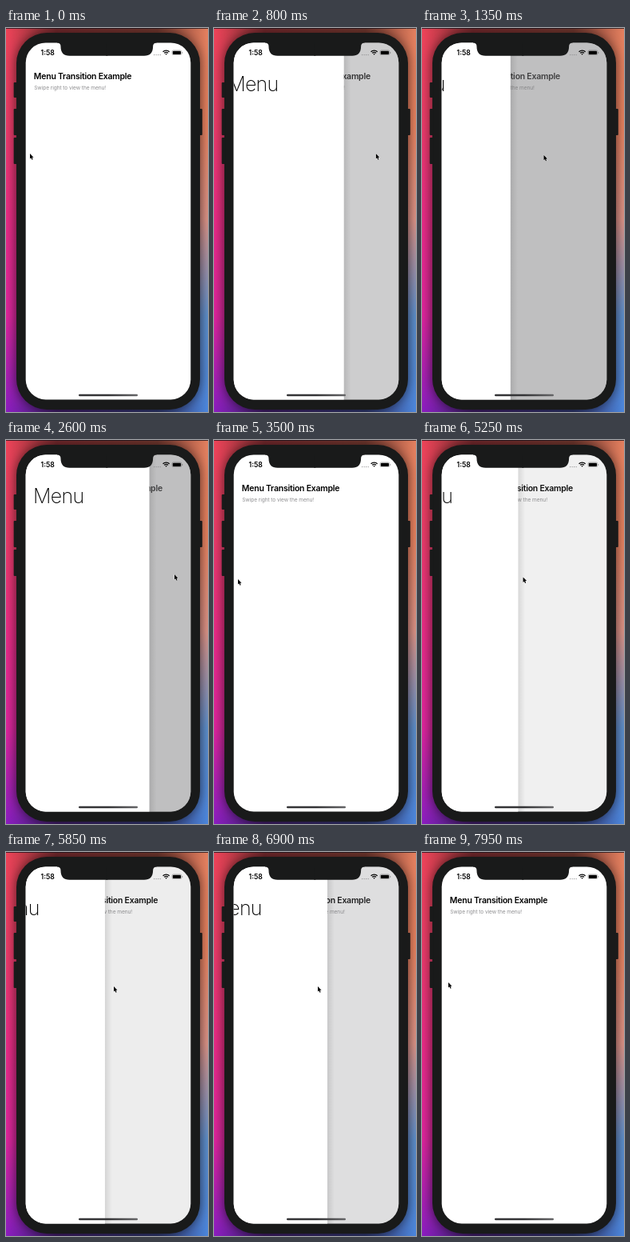
These frames come from a looping animation (253x480 px, 8000 ms). An HTML page with a canvas:

```html
<!DOCTYPE html>
<html lang="en">
<head>
<meta charset="utf-8">
<title>Menu transition</title>
<style>
html, body { margin: 0; width: 100%; height: 100%; overflow: hidden; }
canvas { display: block; width: 253px; height: 480px; }
</style>
</head>
<body>
<canvas id="stage"></canvas>
<script>
const W = 253, H = 480, LOOP = 8000, STEP = 50;
const SCREEN = { x: 24.7, y: 18.4, w: 206.6, h: 446, r: 25 };
const MENU_X = 25, MENU_W = 154.5;
const BEZEL = '#191a1a';
const FONT = 'Inter, Roboto, "Open Sans", sans-serif';

// Each swipe eases the pointer to (x, y) and the menu to `open`
const REST = { x: 30, y: 157, open: 0 };
const SWIPES = [
  { at: 250, dur: 700, x: 224, y: 157, open: 1 },
  { at: 1100, dur: 600, x: 31, y: 162, open: 0 },
  { at: 2050, dur: 550, x: 211, y: 168, open: 1 },
  { at: 2800, dur: 700, x: 30, y: 174, open: 0 },
  { at: 4215, dur: 700, x: 154, y: 174, open: 0.78 },
  { at: 5000, dur: 550, x: 90, y: 168, open: 0.4 },
  { at: 5600, dur: 500, x: 180, y: 168, open: 0.88 },
  { at: 6200, dur: 400, x: 130, y: 168, open: 0.514 },
  { at: 6700, dur: 400, x: 130, y: 168, open: 1 },
  { at: 7200, dur: 600, x: 33, y: 163, open: 0 }
];

const canvas = document.getElementById('stage');
const ctx = canvas.getContext('2d');
const dpr = window.devicePixelRatio || 1;
canvas.width = W * dpr;
canvas.height = H * dpr;

const clamp = v => Math.max(0, Math.min(1, v));
const mix = (a, b, u) => a + (b - a) * u;
const ease = u => (1 - Math.cos(Math.PI * clamp(u))) / 2;

function pose(t) {
  let s = { ...REST, closing: false };
  for (const swipe of SWIPES) {
    if (t < swipe.at) break;
    const u = ease((t - swipe.at) / swipe.dur);
    const closing = swipe.open === 0;
    s = {
      x: mix(s.x, swipe.x, u),
      y: mix(s.y, swipe.y, u),
      // a closing menu gets there before the pointer stops
      open: mix(s.open, swipe.open, closing ? clamp(u * 1.2) : u),
      closing
    };
  }
  return s;
}

// The content slides in the first 3/4 of a transition and dims in the last half
function contentState({ open, closing }) {
  const along = closing ? 1 - open : open;
  const slide = clamp(along / 0.75), dim = clamp(along * 2 - 1);
  return closing ? { slide: 1 - slide, dim: 1 - dim } : { slide, dim };
}

function roundBox(x, y, w, h, r, fill) {
  ctx.beginPath();
  ctx.roundRect(x, y, w, h, r);
  ctx.fillStyle = fill;
  ctx.fill();
}

// Evenly spaced colours
function gradient(x0, y0, x1, y1, ...colors) {
  const g = ctx.createLinearGradient(x0, y0, x1, y1);
  colors.forEach((c, i) => g.addColorStop(i / (colors.length - 1), c));
  return g;
}

function text(str, x, y, size, weight, color, spacing = 0) {
  ctx.font = `${weight} ${size}px ${FONT}`;
  ctx.letterSpacing = spacing + 'px';
  ctx.fillStyle = color;
  ctx.fillText(str, x, y);
}

function drawWallpaper() {
  ctx.fillStyle = gradient(0, 0, 0, H, '#ee4358', '#e93a68', '#e92a86', '#de249c', '#8a1cc0');
  ctx.fillRect(0, 0, W, H);
  ctx.fillStyle = gradient(0, 0, 0, H, '#e4805f', '#e8835f', '#dc9588', '#5c90cc', '#4a86dc');
  for (let x = 0; x < W; x++) {
    ctx.globalAlpha = x / W;
    ctx.fillRect(x, 0, 1, H);
  }
  ctx.globalAlpha = 1;
  const clear = 'rgba(0,0,0,0)', shade = 'rgba(0,0,0,0.5)';
  ctx.fillStyle = gradient(0, 0, W, 0, clear, shade, shade, shade, clear);
  ctx.fillRect(0, 0, W, H);
}

function drawPhone() {
  ctx.save();
  ctx.shadowColor = 'rgba(0,0,0,0.55)';
  ctx.shadowBlur = 14 * dpr;
  roundBox(13, 6, 230, 471, 38, BEZEL);
  ctx.restore();
  roundBox(9.7, 68, 5, 19, 1, BEZEL);
  roundBox(9.7, 101, 5, 33, 1, BEZEL);
  roundBox(9.7, 137, 5, 33, 1, BEZEL);
  roundBox(241, 101, 4.8, 33, 1, BEZEL);
  ctx.fillStyle = 'rgba(20,16,24,0.75)';
  ctx.fillRect(0, 0, W, 1);
}

function drawContent(s) {
  const { slide, dim } = contentState(s);
  const dx = slide * MENU_W / 4;
  ctx.fillStyle = '#fff';
  ctx.fillRect(0, 0, W, H);
  text('Menu Transition Example', 34.8 + dx, 63.7, 10.5, 600, '#000', -0.24);
  text('Swipe right to view the menu!', 35.2 + dx, 77.4, 6.6, 400, '#8e8e90', -0.08);
  ctx.fillStyle = `rgba(128,128,130,${dim * 0.5})`;
  ctx.fillRect(0, 0, W, H);
}

function drawMenu(s) {
  if (s.open <= 0) return;
  const edge = MENU_X + MENU_W * s.open;
  ctx.fillStyle = gradient(edge, 0, edge + 9, 0, 'rgba(0,0,0,0.1)', 'rgba(0,0,0,0.05)', 'rgba(0,0,0,0)');
  ctx.fillRect(edge, 0, 9, H);
  ctx.fillStyle = '#fff';
  ctx.fillRect(0, 0, edge, H);
  text('Menu', edge - MENU_W + 9, 79, 25, 200, '#000', -0.7);
}

function drawNotch() {
  const mid = 126.3;
  ctx.fillStyle = BEZEL;
  for (const side of [-1, 1]) {
    const at = d => mid + side * d;
    ctx.beginPath();
    ctx.moveTo(mid, 17);
    ctx.lineTo(at(62.3), 17);
    ctx.lineTo(at(62.3), 18.5);
    ctx.quadraticCurveTo(at(57.8), 18.5, at(57.8), 23);
    ctx.bezierCurveTo(at(57.8), 31, at(53.8), 34.8, at(46.8), 34.8);
    ctx.lineTo(mid - side, 34.8);
    ctx.lineTo(mid - side, 17);
    ctx.fill();
  }
}

function drawStatus() {
  text('1:58', 43.6, 34, 8.7, 600, '#000');
  for (let i = 0; i < 4; i++) roundBox(185 + i * 2.5, 32.9, 1.3, 1.3, 0.65, '#8a8a8c');

  ctx.strokeStyle = '#000';
  ctx.lineWidth = 1.35;
  for (const r of [1, 3.4, 5.7]) {
    ctx.beginPath();
    ctx.arc(200.6, 33.8, r, Math.PI * 1.25, Math.PI * 1.75);
    ctx.stroke();
  }

  ctx.beginPath();
  ctx.roundRect(208, 27.9, 11.8, 5.8, 1.7);
  ctx.strokeStyle = 'rgba(0,0,0,0.4)';
  ctx.lineWidth = 0.6;
  ctx.stroke();
  roundBox(208.8, 28.7, 10.2, 4.2, 1, '#000');
  roundBox(220.4, 29.9, 0.8, 1.9, 0.4, 'rgba(0,0,0,0.45)');
  roundBox(91, 457.7, 74, 2.5, 1.25, gradient(91, 0, 165, 0, '#343436', '#343436', '#666668'));
}

function drawPointer(x, y) {
  ctx.save();
  ctx.translate(x, y);
  ctx.scale(0.86, 0.86);
  ctx.beginPath();
  ctx.moveTo(0, 0);
  ctx.lineTo(0, 7.6);
  ctx.lineTo(1.7, 6.1);
  ctx.lineTo(2.9, 8.9);
  ctx.lineTo(4.2, 8.3);
  ctx.lineTo(3.1, 5.6);
  ctx.lineTo(5.3, 5.4);
  ctx.closePath();
  ctx.strokeStyle = '#fff';
  ctx.lineWidth = 1;
  ctx.stroke();
  ctx.fillStyle = '#000';
  ctx.fill();
  ctx.restore();
}

function draw(t) {
  const s = pose(t);
  ctx.setTransform(dpr, 0, 0, dpr, 0, 0);
  drawWallpaper();
  drawPhone();
  ctx.save();
  ctx.beginPath();
  ctx.roundRect(SCREEN.x, SCREEN.y, SCREEN.w, SCREEN.h, SCREEN.r);
  ctx.clip();
  drawContent(s);
  drawMenu(s);
  ctx.restore();
  drawNotch();
  drawStatus();
  drawPointer(s.x, s.y);
}

const start = performance.now();
function tick() {
  const t = (performance.now() - start) % LOOP;
  draw(Math.floor(t / STEP) * STEP);
  requestAnimationFrame(tick);
}
tick();
</script>
</body>
</html>
```
